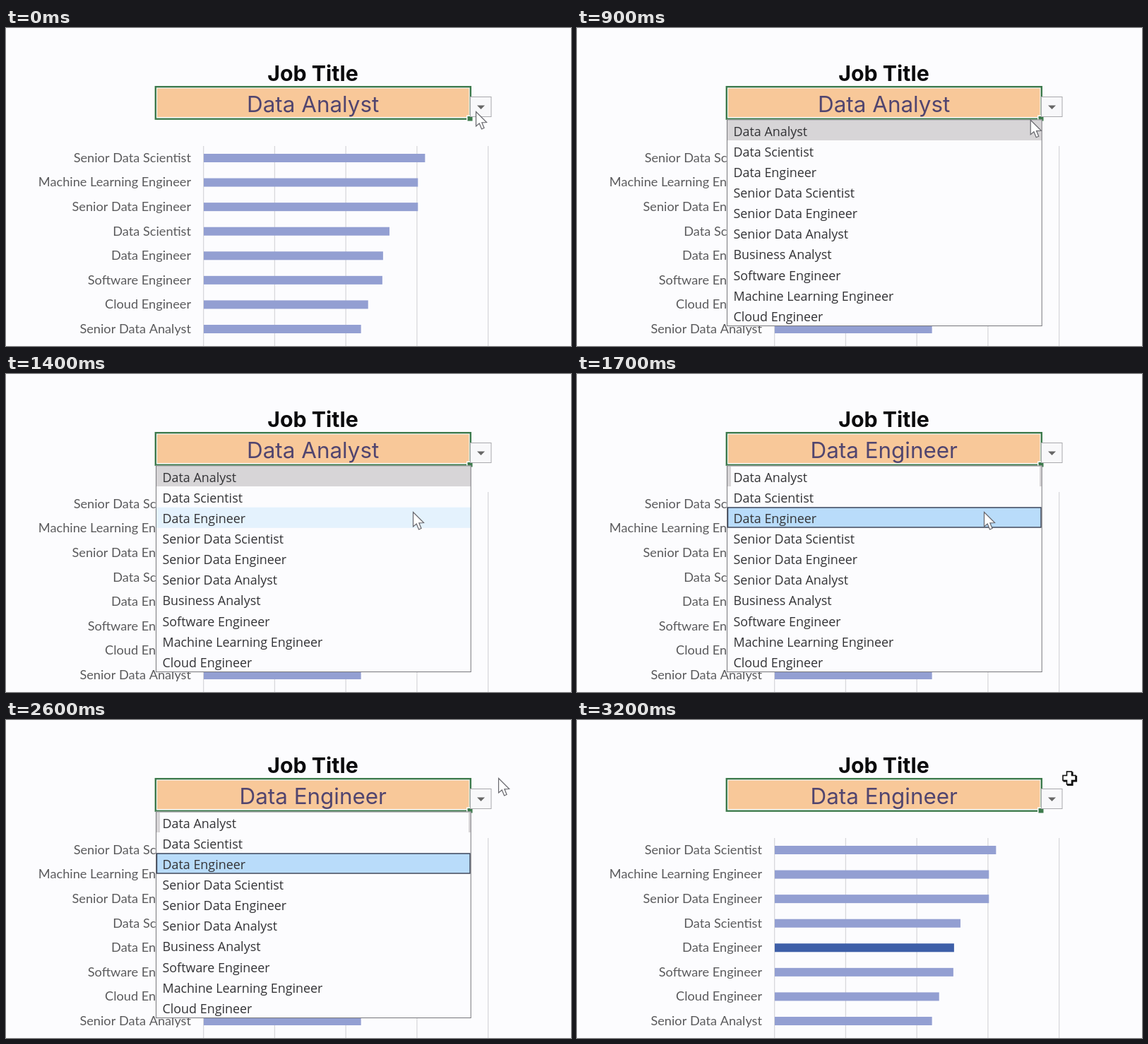
Recreate the animation shown at these times as an HTML page with a canvas. Size 800 by 450 pixels, loop 3300 ms.

```html
<!DOCTYPE html>
<html lang="en">
<head>
<meta charset="utf-8">
<title>Job title picker</title>
<style>
  html, body { margin: 0; width: 100%; height: 100%; overflow: hidden; background: #fcfcfe; }
  canvas { display: block; }
</style>
</head>
<body>
<canvas id="stage" width="800" height="450"></canvas>
<script>
const ctx = document.getElementById('stage').getContext('2d');
const LOOP = 3300, STEP = 100;
const OPEN = 200, PICK = 1600, CLOSE = 2700;
const ROW = 29.1, LIST_TOP = 130.5, UNIT = 100.75;
const PAPER = '#fcfcfe', GREEN = '#3d7a4c';

// Bar lengths in gridline units
const bars = {
  'Senior Data Scientist': 3.11, 'Machine Learning Engineer': 3.01,
  'Senior Data Engineer': 3.01, 'Data Scientist': 2.61,
  'Data Engineer': 2.52, 'Software Engineer': 2.51,
  'Cloud Engineer': 2.31, 'Senior Data Analyst': 2.21
};
const options = ['Data Analyst', 'Data Scientist', 'Data Engineer', 'Senior Data Scientist',
  'Senior Data Engineer', 'Senior Data Analyst', 'Business Analyst', 'Software Engineer',
  'Machine Learning Engineer', 'Cloud Engineer'];

const button = { x: 668, y: 118 }, choice = { x: 576, y: 195 }, outside = { x: 697, y: 82 };
const arrow = new Path2D('M.5 .5V21L5.2 17 8.5 25 12 23.5 8.8 15.8 15.5 15.5Z');

// The pointer starts level and bends into its vertical travel
function glide(a, b, t, from, to) {
  const k = Math.min(1, Math.max(0, (t - from) / (to - from)));
  return { x: a.x + (b.x - a.x) * k, y: a.y + (b.y - a.y) * k ** 1.5 };
}

function pointer(t) {
  if (t < 700) return glide({ x: 665, y: 118 }, button, t, 0, 300);
  if (t < 2000) return glide(button, choice, t, 700, 1400);
  return glide(choice, outside, t, 2000, 2600);
}

function rect(x, y, w, h, fill) {
  ctx.fillStyle = fill;
  ctx.fillRect(x, y, w, h);
}

function frame(x, y, w, h, color, width = 1) {
  ctx.strokeStyle = color;
  ctx.lineWidth = width;
  ctx.strokeRect(x, y, w, h);
}

function text(str, x, y, font, color, align = 'left') {
  ctx.font = font;
  ctx.fillStyle = color;
  ctx.textAlign = align;
  ctx.fillText(str, x, y);
}

function chart(chosen) {
  for (let i = 0; i < 5; i++) rect(279 + i * UNIT, 167, 1.3, 283, '#d8d8dc');
  Object.entries(bars).forEach(([name, size], i) => {
    const y = 183.8 + i * 34.57;
    text(name, 262, y + 6, '18.2px Lato, Carlito, sans-serif', '#5b5b5d', 'right');
    rect(280, y - 5.8, size * UNIT, 12, name === chosen ? '#3e5fa8' : '#939fd2');
  });
}

function cell(value) {
  text('Job Title', 434.5, 75, 'bold 30.3px Inter, sans-serif', '#0b0b0d', 'center');
  rect(211, 82, 448, 48, '#fff');
  rect(214, 85.5, 441.5, 40.5, '#f8c899');
  frame(211.8, 83.2, 446, 45.5, GREEN, 2.4);
  text(value, 434.7, 119, '31.4px Inter, sans-serif', '#51456f', 'center');
  rect(652, 123.5, 9, 8, '#fff');
  rect(653.5, 125, 7, 6.5, GREEN);
}

function dropButton() {
  rect(657, 97, 30, 28, '#f8f8fa');
  frame(657.5, 97.5, 29.5, 28, '#a9a9ad');
  ctx.fillStyle = '#666';
  ctx.fill(new Path2D('M667 109.5h11l-5.5 5.5Z'));
}

function list(picked, hover) {
  const rowTop = i => LIST_TOP + i * ROW;
  rect(212, LIST_TOP - 1, 446.5, 292.5, PAPER);
  rect(213, 131, 445, 28, '#d7d5d7');
  if (picked) {
    rect(218, 131, 437, 28, PAPER);
    rect(213.5, rowTop(2), 443.5, 28, '#b9dcfa');
    frame(213.5, rowTop(2) + 0.3, 443.5, 28, '#343c50', 1.4);
  } else if (hover > 0) {
    rect(213, rowTop(hover), 445, ROW, '#e4f2fd');
  }
  frame(212.5, LIST_TOP - 0.5, 445.7, 291.5, '#77777b');
  options.forEach((name, i) =>
    text(name, 221.5, rowTop(i) + 22.3, '17.9px "Open Sans", "Noto Sans", sans-serif', '#333336'));
}

function drawArrow({ x, y }) {
  ctx.save();
  ctx.translate(x, y);
  ctx.fillStyle = '#fff';
  ctx.fill(arrow);
  ctx.strokeStyle = '#66666c';
  ctx.lineWidth = 1.2;
  ctx.stroke(arrow);
  ctx.restore();
}

function drawCross({ x, y }) {
  const plus = (dx, arm, half, color) => {
    rect(x + dx - arm, y + dx - half, arm * 2, half * 2, color);
    rect(x + dx - half, y + dx - arm, half * 2, arm * 2, color);
  };
  plus(1.3, 9.8, 4.3, '#111');
  plus(0, 9.8, 4.3, '#111');
  plus(0, 8.2, 2.7, '#fff');
}

function draw(t) {
  const spot = pointer(t);
  const picked = t >= PICK, closed = t >= CLOSE;
  const value = options[picked ? 2 : 0];
  rect(0, 0, 800, 450, PAPER);
  chart(closed ? value : '');
  cell(value);
  dropButton();
  if (t >= OPEN && !closed) list(picked, Math.floor((spot.y - LIST_TOP) / ROW));
  (closed ? drawCross : drawArrow)(spot);
}

const start = performance.now();
function tick() {
  const t = (performance.now() - start) % LOOP;
  draw(Math.floor(t / STEP) * STEP);
  requestAnimationFrame(tick);
}
tick();
</script>
</body>
</html>
```
